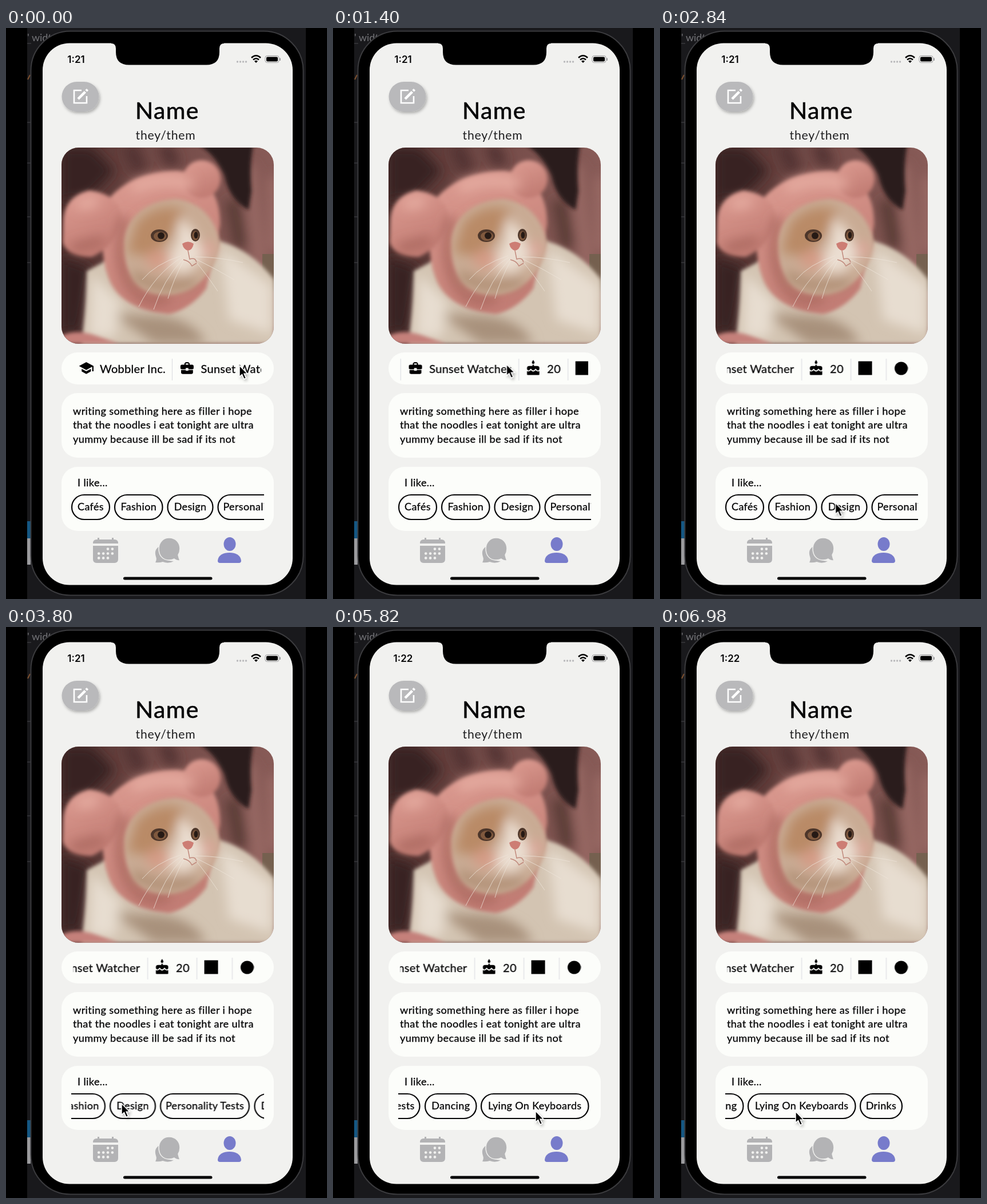
These frames come from a looping animation (561x998 px, 7000 ms). An HTML page:

```html
<!DOCTYPE html>
<html lang="en">
<head>
<meta charset="utf-8">
<title>Profile screen</title>
<style>
html, body { margin: 0; width: 100%; height: 100%; overflow: hidden; background: #000; }
svg { display: block; width: 100vw; height: 100vh; }
text { font-family: Lato, "Open Sans", sans-serif; fill: #060607; stroke: #060607; stroke-width: .3px; }
.name { font-size: 41px; letter-spacing: 1.3px; stroke-width: .6px; }
.pronouns { font-size: 21.2px; letter-spacing: .8px; fill: #1d1d1f; stroke: none; }
.body { font-size: 18.2px; letter-spacing: .35px; }
.info { font-size: 20px; letter-spacing: .3px; }
.chip text { font-size: 18px; letter-spacing: .35px; text-anchor: middle; }
.chip rect { fill: #fdfdfb; stroke: #060607; stroke-width: 2.2; }
.clock { font: 600 17px Inter, sans-serif; text-anchor: middle; stroke: none; }
.behind { font-size: 18px; fill: #737377; stroke: none; }
.card { fill: #fcfdfa; }
.gray { fill: #b3b3b5; }
.divider { stroke: #dddee3; stroke-width: 1.2; }

#info, #chips, #cursor { animation: 7s ease-in-out infinite; }
#info { animation-name: info; }
#chips { animation-name: chips; }
#cursor { animation-name: cursor; }
.early { animation: early 7s step-end infinite; }
.late { animation: late 7s step-end infinite; }

@keyframes info {
  0%, 1.5% { transform: translateX(0); }
  10%, 19% { transform: translateX(-169px); }
  27%, 30% { transform: translateX(-273px); animation-timing-function: ease-out; }
  35.5%, 100% { transform: translateX(-249.5px); }
}
@keyframes chips {
  0%, 43.5% { transform: translateX(0); }
  53.5%, 64% { transform: translateX(-100.5px); animation-timing-function: ease-in; }
  72% { transform: translateX(-199px); animation-timing-function: ease-out; }
  79.5%, 83.5% { transform: translateX(-374px); }
  98.5%, 100% { transform: translateX(-479px); }
}
@keyframes cursor {
  0%, 1% { transform: translate(408px, 590px); }
  9.7%, 11% { transform: translate(194px, 582px); }
  18%, 19% { transform: translate(308px, 588px); }
  26.5%, 29.5% { transform: translate(181px, 589px); }
  41.5%, 43% { transform: translate(308px, 833px); }
  53%, 55% { transform: translate(202px, 833px); }
  62.5%, 63.5% { transform: translate(454px, 831px); animation-timing-function: ease-in; }
  72% { transform: translate(354px, 831px); animation-timing-function: ease-out; }
  76% { transform: translate(250px, 838px); }
  82.5%, 83.3% { transform: translate(354px, 846px); }
  98.3%, 100% { transform: translate(237px, 847px); }
}
@keyframes early { 0% { opacity: 1; } 77.2% { opacity: 0; } }
@keyframes late { 0% { opacity: 0; } 77.2% { opacity: 1; } }
</style>
</head>
<body>
<svg viewBox="0 0 561 998" preserveAspectRatio="none">
  <defs>
    <clipPath id="photoClip"><rect x="97" y="209" width="371" height="343" rx="30"/></clipPath>
    <clipPath id="infoClip"><rect x="117" y="567" width="329" height="56"/></clipPath>
    <clipPath id="chipClip"><rect x="114" y="810" width="337" height="56"/></clipPath>
    <filter id="soft" x="-20%" y="-20%" width="140%" height="140%"><feGaussianBlur stdDeviation="3"/></filter>
    <filter id="softer" x="-50%" y="-50%" width="200%" height="200%"><feGaussianBlur stdDeviation="10"/></filter>
    <filter id="drop" x="-30%" y="-30%" width="170%" height="170%">
      <feDropShadow dx="2" dy="3" stdDeviation="2.5" flood-opacity=".28"/>
    </filter>
    <linearGradient id="blanket">
      <stop offset="0" stop-color="#4c2f2d"/>
      <stop offset=".45" stop-color="#724a47"/>
      <stop offset="1" stop-color="#885b57"/>
    </linearGradient>
    <linearGradient id="wool" x2=".4" y2="1">
      <stop offset="0" stop-color="#dd9c92"/>
      <stop offset="1" stop-color="#c27d74"/>
    </linearGradient>
  </defs>

  <!-- desktop behind the phone -->
  <rect x="37" width="487" height="998" fill="#19191c"/>
  <path d="M37 27H44M37 165H44M37 236H44M37 330H44M37 410H44" stroke="#303034" stroke-width="2"/>
  <path d="M38 90L42 82" stroke="#81522f" stroke-width="2"/>
  <rect x="37" y="862" width="6" height="30" fill="#155783"/>
  <rect x="37" y="892" width="6" height="46" fill="#9b9b9e"/>
  <text class="behind" x="37" y="23">' widt</text>

  <!-- phone -->
  <rect x="43.5" y="5.5" width="476" height="986" rx="69" fill="#000" stroke="#3b3b3e" stroke-width="2"/>
  <rect x="64" y="26.5" width="437" height="947" rx="47" fill="#f1f1ef"/>
  <path d="M184 26H381V27Q373 27 373 36V42Q373 64.5 350 64.5H215Q192 64.5 192 42V36Q192 27 184 27Z"/>

  <!-- status bar -->
  <text class="clock early" x="122.5" y="61">1:21</text>
  <text class="clock late" x="122.5" y="61">1:22</text>
  <g fill="#b9b9bb" id="signal"></g>
  <path d="M429 52Q437 44.5 445 52M432 55.5Q437 51 442 55.5" fill="none" stroke="#000" stroke-width="2.6"/>
  <path d="M434 58Q437 55.5 440 58L437 61Z"/>
  <rect x="453" y="48.5" width="24" height="12" rx="3.5" fill="none" stroke="#9b9b9d"/>
  <rect x="455" y="50.5" width="20" height="8" rx="2"/>
  <path d="M479 52.5V57" stroke="#9b9b9d" stroke-width="1.8"/>

  <!-- header -->
  <rect x="97.5" y="94" width="65" height="52" rx="26" fill="#b9b9bb" filter="url(#drop)"/>
  <g fill="none" stroke="#fff" stroke-width="2.6">
    <path d="M132 109H119V131H141V119"/>
    <path d="M126 124L138.500 111.500M140 110L142.500 107.500" stroke-width="4.5"/>
  </g>
  <text class="name" x="226" y="159">Name</text>
  <text class="pronouns" x="226.5" y="195">they/them</text>

  <!-- photo -->
  <g clip-path="url(#photoClip)">
    <rect x="97" y="209" width="371" height="343" fill="url(#blanket)"/>
    <g filter="url(#softer)">
      <path d="M97 209H150L190 250L140 300H97ZM97 400L150 420L130 530H97Z" fill="#392220"/>
      <path d="M215 205L235 250M275 205L295 240" stroke="#513330" stroke-width="24"/>
      <path d="M425 240L445 430M468 260V390" stroke="#9b6c66" stroke-width="18"/>
      <path d="M395 300L410 385" stroke="#593a36" stroke-width="24"/>
    </g>
    <path d="M338 205H432Q425 240 429 285L424 318Q390 300 382 258Q366 222 338 205Z" fill="#2a1b1b" filter="url(#soft)"/>
    <path d="M448 395H468V460H448Z" fill="#75604f"/>
    <path d="M132 552Q142 480 141 425L178 405L240 470L350 420L372 372Q430 388 468 440V552Z" fill="#d3c4b2" filter="url(#soft)"/>
    <g filter="url(#softer)">
      <path d="M150 430L200 480L190 540H145ZM375 385L465 450V535L390 510Z" fill="#e7ddd0"/>
      <path d="M190 500Q240 540 260 552H350Q330 510 270 503Z" fill="#a8917b"/>
    </g>
    <path d="M97 538Q122 525 158 538L198 552H97Z" fill="#c5807a" filter="url(#soft)"/>
    <g fill="url(#wool)" filter="url(#soft)">
      <path d="M174 306C200 268 248 250 300 250C350 255 376 292 374 345L350 455C333 478 310 495 284 500C228 494 190 474 177 430C166 400 166 345 174 306Z"/>
      <circle cx="342" cy="264" r="33"/>
      <path d="M100 340Q100 296 145 284Q199 291 202 330Q196 378 150 400Q107 399 99 375Z"/>
    </g>
    <g filter="url(#softer)">
      <path d="M220 280Q270 258 325 274M125 310L160 302" fill="none" stroke="#e6ada2" stroke-width="18"/>
      <path d="M208 330Q188 400 215 445T285 470M115 385L170 372" fill="none" stroke="#a8665d" stroke-width="15"/>
    </g>
    <path d="M207 382C205 336 240 303 296 299C342 303 368 338 374 376C372 408 351 440 322 456C290 473 245 470 224 442Q207 418 207 382Z" fill="#c9ab94" filter="url(#soft)"/>
    <g filter="url(#softer)">
      <path d="M228 340Q270 300 312 320L290 362L253 400L212 392Z" fill="#b98a66"/>
      <path d="M302 330L327 352L348 400L316 430L275 420L300 370Z" fill="#ebded1"/>
      <ellipse cx="266" cy="405" rx="22" ry="16" fill="#d59b86"/>
      <ellipse cx="354" cy="386" rx="13" ry="14" fill="#dba698"/>
      <path d="M222 430Q270 466 330 440" fill="none" stroke="#a8866c" stroke-width="14"/>
    </g>
    <g fill="#4d362a">
      <ellipse cx="268" cy="363" rx="15" ry="11"/>
      <ellipse cx="331" cy="362" rx="8" ry="11"/>
    </g>
    <g fill="#80593e">
      <ellipse cx="269" cy="364" rx="11" ry="8"/>
      <ellipse cx="331" cy="363" rx="5.5" ry="8"/>
    </g>
    <g fill="#261a15"><circle cx="271" cy="363" r="6"/><ellipse cx="332" cy="362" rx="3.5" ry="6"/></g>
    <path d="M308 377Q318 370 328 377Q326 388 318 389Q310 387 308 377Z" fill="#cd7d74"/>
    <path d="M318 389L321 404Q332 400 333 411L325 416Q321 407 310 405" fill="none" stroke="#c08a7d" stroke-width="1.5"/>
    <path d="M307 401Q260 430 232 487M309 404Q275 440 258 492M311 406Q292 440 283 473M306 398Q260 413 238 440M331 400Q370 400 414 410M332 404Q365 420 399 440M332 409Q350 430 370 460" fill="none" stroke="#eee4da" opacity=".75"/>
  </g>

  <!-- cards -->
  <rect class="card" x="97" y="567" width="371" height="56" rx="28"/>
  <rect class="card" x="97" y="638" width="371" height="113" rx="28"/>
  <rect class="card" x="97" y="767" width="371" height="112" rx="28"/>

  <g clip-path="url(#infoClip)">
    <g id="info">
      <path class="divider" d="M290.500 578V616M497 578V616M583 578V616M645 578V616"/>
      <path transform="translate(126.500 580.500) scale(1.150)" d="M5 13.200v4L12 21l7-3.800v-4L12 17l-7-3.800zM12 3L1 9l11 6 9-4.900V17h2V9L12 3z"/>
      <text class="info" x="164" y="602.5">Wobbler Inc.</text>
      <path transform="translate(302.600 580.500) scale(1.150)" d="M10 16v-1H3L3 19c0 1.100.9 2 2 2h14c1.100 0 2-.9 2-2v-4h-7v1h-4zm10-9h-4V5l-2-2h-4l-2 2v2H4c-1.100 0-2 .9-2 2v3c0 1.100.9 2 2 2h6v-2h4v2h6c1.100 0 2-.9 2-2V9c0-1.100-.9-2-2-2zm-6 0h-4V5h4v2z"/>
      <text class="info" x="340.5" y="602.5">Sunset Watcher</text>
      <g transform="translate(507.800 580) scale(1.200)">
        <path d="M12 0L10.300 3Q9.500 5.500 12 6Q14.500 5.500 13.700 3ZM11 7h2v2h5q3 0 3 3v1.500q-1.500 3.500-3.500 1.300l-2-2-2 2q-1.500 1.300-3 0l-2-2-2 2q-2 2-3.500-1.300V12q0-3 3-3h5Z"/>
        <path d="M3 16.400q2.500 1.300 4.400-.4l1.100-1.100 1.100 1.100q2.400 2 4.800 0l1.100-1.100 1.100 1.100q2 1.700 4.400.4V21q0 1-1 1H4q-1 0-1-1Z"/>
      </g>
      <text class="info" x="546.5" y="602.5">20</text>
      <rect x="596" y="582.5" width="24" height="24"/>
      <circle cx="671" cy="595" r="11.5"/>
    </g>
  </g>

  <g class="body">
    <text x="117" y="676">writing something here as filler i hope</text>
    <text x="117" y="700">that the noodles i eat tonight are ultra</text>
    <text x="117" y="725">yummy because ill be sad if its not</text>
    <text x="125" y="801">I like...</text>
  </g>
  <g clip-path="url(#chipClip)"><g id="chips" class="chip"></g></g>

  <!-- tab bar -->
  <g class="gray">
    <path d="M152 901V900.500Q152 894 158.500 894H160V891H163V894H185V891H188V894H189.500Q196 894 196 900.500V901Z"/>
    <path d="M152 905H196V928.500Q196 935 189.500 935H158.500Q152 935 152 928.500Z"/>
    <path d="M261 934Q264 929 262 924Q258 912 268 906Q265 930 293 932Q284 937 274 933Q268 935 261 934Z"/>
    <path d="M285 891C297 891 304 900 304 910Q304 916 301 921Q302 926 304 931Q298 931 294 928Q290 930 285 930C273 930 267 921 267 910C267 900 274 891 285 891Z" stroke="#f1f1ef" stroke-width="1.5"/>
  </g>
  <g fill="#f1f1ef" id="days"></g>
  <g fill="#777bcb">
    <ellipse cx="391" cy="902" rx="10.5" ry="12"/>
    <path d="M370 931C371 921 380 917 390.500 917S410 921 411 931Q411 935 407 935H374Q370 935 370 931Z"/>
  </g>
  <path d="M207.500 962H358" stroke="#000" stroke-width="5" stroke-linecap="round"/>

  <g id="cursor">
    <path d="M0 0V19.500L4.500 15.500L8 23.500L11.500 22L8 14.300H14Z" stroke="#fff" stroke-width="1.4" filter="url(#drop)"/>
  </g>
</svg>
<script>
const NS = "http://www.w3.org/2000/svg";
function add(parent, tag, attrs, text = "") {
  const el = document.createElementNS(NS, tag);
  for (const key in attrs) el.setAttribute(key, attrs[key]);
  el.textContent = text;
  document.getElementById(parent).append(el);
}

const chips = [
  ["Cafés", 115, 66], ["Fashion", 190, 83.5], ["Design", 282.5, 79],
  ["Personality Tests", 370.5, 155], ["Dancing", 535, 89.5],
  ["Lying On Keyboards", 633, 187.5], ["Drinks", 829, 73]
];
for (const [label, x, width] of chips) {
  add("chips", "rect", { x, y: 816, width, height: 43, rx: 21.5 });
  add("chips", "text", { x: x + width / 2, y: 842.5 }, label);
}

// Calendar dots: a 4 by 3 grid with the first two and the last left blank.
for (let i = 2; i < 11; i++) {
  add("days", "circle", { cx: 162.2 + (i % 4) * 7.9, cy: 910.6 + Math.floor(i / 4) * 7.9, r: 2.3 });
}
for (let i = 0; i < 4; i++) {
  add("signal", "circle", { cx: 404.5 + i * 5, cy: 59, r: 1.7 });
}
</script>
</body>
</html>
```
